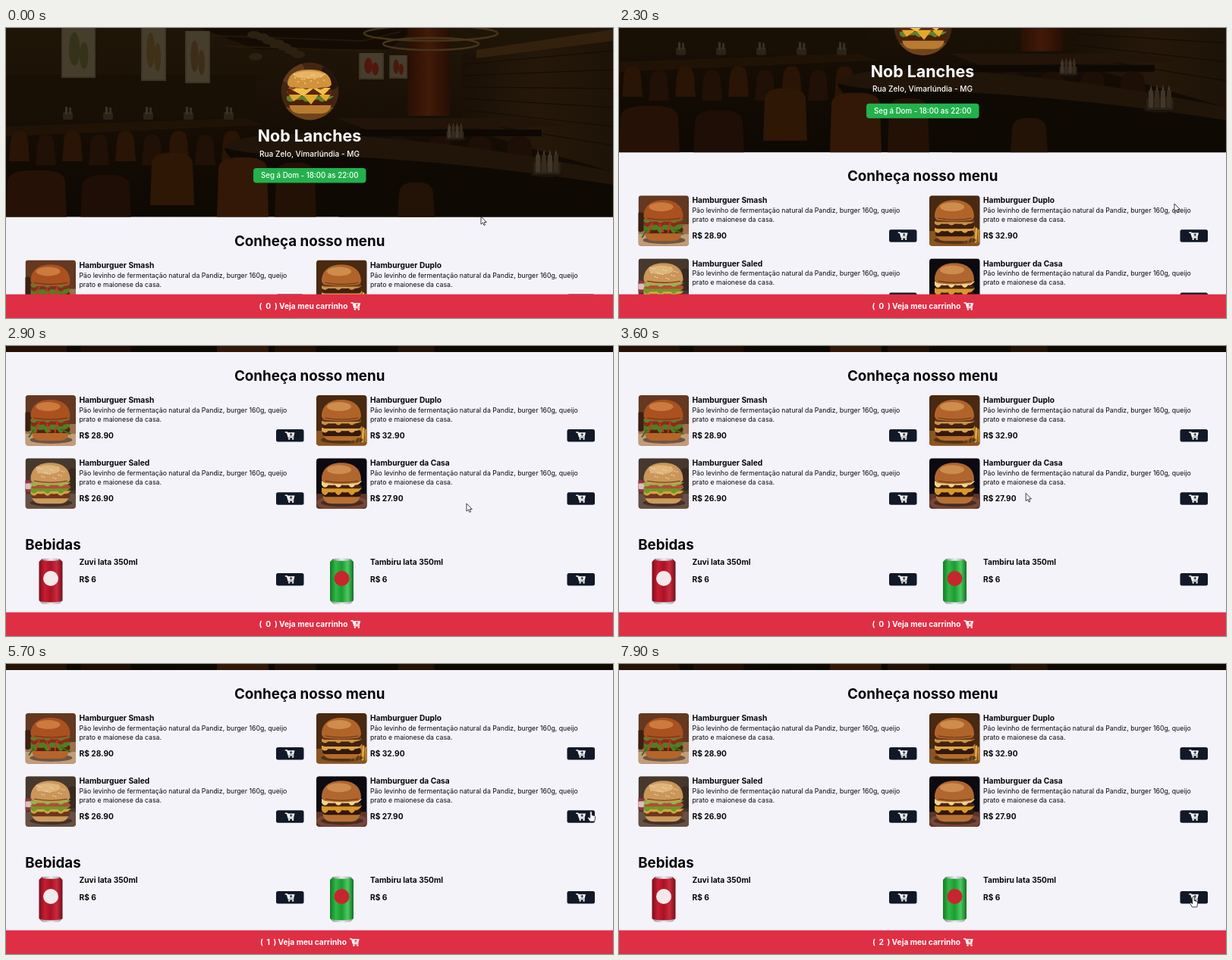
Animation of 800 by 383 pixels, one loop 8000 ms. Source, as an HTML page:

```html
<!DOCTYPE html>
<html lang="pt-BR">
<head>
<meta charset="utf-8">
<title>Menu</title>
<style>
  html, body { margin: 0; width: 100%; height: 100%; overflow: hidden; background: #f4f3f9; }
  svg { display: block; width: 100vw; height: 100vh; }
  text { font-family: Inter, "Open Sans", sans-serif; fill: #08080a; white-space: pre; }
  .b { font-weight: 700; }
  .m { font-weight: 500; }
  .w { fill: #fff; }
  .c { text-anchor: middle; }
  .e { text-anchor: end; }
</style>
</head>
<body>
<svg id="stage" viewBox="0 0 800 383" preserveAspectRatio="none"></svg>
<script>
const LOOP = 8000;
const SCROLL_END = 241.5;
const HERO_HEIGHT = 249.5;

const text = (x, y, size, str, cls = '') =>
  `<text x="${x}" y="${y}" font-size="${size}" class="${cls}">${str}</text>`;
const rect = (x, y, w, h, fill, rx = 0, more = '') =>
  `<rect x="${x}" y="${y}" width="${w}" height="${h}" rx="${rx}" fill="${fill}" ${more}/>`;
const path = (d, fill, more = '') => `<path d="${d}" fill="${fill}" ${more}/>`;
const line = (d, color, width) => path(d, 'none', `stroke="${color}" stroke-width="${width}" stroke-linecap="round"`);
const oval = (x, y, rx, ry, fill, more = '') =>
  `<ellipse cx="${x}" cy="${y}" rx="${rx}" ry="${ry}" fill="${fill}" ${more}/>`;
const group = (x, y, body, scale = 1) => `<g transform="translate(${x} ${y}) scale(${scale})">${body}</g>`;
const gradient = (id, dir, ...stops) => `<linearGradient id="${id}" x2="${dir === 'x' ? 1 : 0}" y2="${dir === 'y' ? 1 : 0}">` +
  stops.map((c, i) => `<stop offset="${i / (stops.length - 1)}" stop-color="${c}"/>`).join('') + '</linearGradient>';
const repeat = (n, fn) => Array.from({ length: n }, (_, i) => fn(i)).join('');

const defs = `<defs>
  ${gradient('wall', 'y', '#1f1507', '#1b1106', '#130b04', '#0e0803')}
  ${gradient('wood', 'x', '#1a1006', '#25180a', '#1e1308')}
  ${gradient('pillar', 'x', '#280f04', '#421a08', '#260e04')}
  ${gradient('red', 'x', '#7d0d1b', '#c81d31', '#a81325', '#c92a3e', '#74101c')}
  ${gradient('green', 'x', '#167a28', '#2fb944', '#1d9a34', '#4bcb5c', '#14702a')}
  ${gradient('steel', 'x', '#8d9095', '#eceef0', '#a0a3a7')}
  <clipPath id="photo"><rect width="66.5" height="66.5" rx="4"/></clipPath>
  <clipPath id="round"><circle cx="400.5" cy="83.5" r="38"/></clipPath>
  <clipPath id="hero"><rect width="800" height="${HERO_HEIGHT}"/></clipPath>
</defs>`;

const poster = (x, y, w, h, food) =>
  rect(x, y, w, h, '#3b3325') + rect(x + 1.5, y, w - 3, h - 2, '#463d2d') +
  oval(x + w * .38, y + h * .48, w * .16, h * .3, food) + oval(x + w * .66, y + h * .6, w * .13, h * .24, food);

const chair = (x, y, w, h, color) =>
  path(`M${x} ${y + h}L${x + 2} ${y + 14}Q${x + 3} ${y + 2} ${x + w * .35} ${y}H${x + w * .65}Q${x + w - 3} ${y + 2} ${x + w - 2} ${y + 14}L${x + w} ${y + h}Z`, color);

const bottles = (x, y, scale) => group(x, y,
  oval(0, 22, 25, 4, '#1b140c') + rect(-20, 4, 40, 18, '#2b2217', 2) +
  repeat(4, i => rect(-17 + i * 9, -8, 7, 27, i % 2 ? '#372b1d' : '#40362a', 2.5) +
    path(`M${-15 + i * 9}-8L${-13.5 + i * 9}-16L${-12 + i * 9}-8Z`, '#4a4033')), scale);

function heroPhoto() {
  return rect(0, 0, 800, 250, 'url(#wall)') +
    path('M255 0H540L505 28H330Z', '#140c04') + path('M0 62H330V105H0Z', '#191005') +
    path('M270 10L470 17L520 5M290 24L500 31', 'none', 'stroke="#291909" stroke-width="1.5"') +
    repeat(9, i => oval(327 + i * 29 % 67, 9 + i * 13 % 31, 9, 5, '#2c2010')) +
    path('M600 35L800 8V190L600 132Z', 'url(#wood)') +
    repeat(6, i => line(`M602 ${48 + i * 15}L800 ${30 + i * 25}`, '#140c05', 1.2)) +
    path('M620 29L800 2V17L620 40Z', '#33210e') +
    poster(73, -8, 45, 74, '#343319') + poster(178, -8, 33, 78, '#3f3118') + poster(236, 4, 33, 69, '#3d2d18') +
    poster(465, 33, 33, 35, '#51160d') + poster(505, 36, 24, 31, '#4a190c') +
    rect(529, 0, 56, 116, 'url(#pillar)') +
    repeat(2, i => oval(560, 7 + i * 14, 88 - i * 25, 10 - i * 2, 'none', 'stroke="#46331a" stroke-width="2.5"')) +
    path('M0 130L315 119L340 128L0 143Z', '#201306') +
    repeat(9, i => chair(4 + i * 35, 136 + i % 2 * 5, 27, 40, i % 2 ? '#201006' : '#291405')) +
    repeat(5, i => group(75 + i * 53, 111, rect(0, 0, 13, 10, '#2c2317', 2) + rect(3, -7, 3, 10, '#3c3225') + rect(8, -6, 3, 9, '#382e21'))) +
    path('M435 119H690L735 129L480 136Z', '#221408') + path('M450 134H706V143H454Z', '#0e0804') +
    repeat(4, i => chair(500 + i * 53, 143, 36, 38, '#1d0f05')) +
    path('M288 160Q292 141 400 139Q560 147 800 205V250H440Q310 203 288 160Z', '#0f0904') +
    path('M288 158Q292 141 400 139Q600 148 800 190V207Q610 177 420 168Q320 169 288 158Z', '#21150a') +
    bottles(592, 134, .58) + bottles(713, 174, .88) +
    chair(0, 188, 80, 62, '#251105') + chair(98, 194, 67, 60, '#1e0e05') +
    chair(190, 165, 58, 69, '#2f1705') + chair(278, 171, 68, 80, '#331807') + chair(354, 178, 55, 73, '#241106') +
    chair(516, 204, 49, 46, '#231206');
}

// Wavy strip used for lettuce, cheese and sauce.
const ruffle = (color, x, y, w, h) => path(`M${x} ${y}H${x + w}` +
  repeat(6, i => `Q${x + w - (i + .5) * w / 6} ${y + h * (i % 2 ? 1.5 : .75)} ${x + w - (i + 1) * w / 6} ${y + h * .65}`) + 'Z', color);

function burger({ back, table, bun, shine, base = bun, layers, extra = '', seeds = 0 }) {
  return rect(0, 0, 67, 67, back) + rect(0, 47, 67, 20, table) + extra +
    oval(34, 59, 28, 5, '#20100a', 'opacity=".5"') +
    path('M9 45H57V52Q55 60 45 60H20Q10 59 9 52Z', base) +
    layers.map(([kind, color, y, h]) => kind === 'bar' ? rect(8, y, 51, h, color, h / 2) : ruffle(color, 7, y, 53, h)).join('') +
    path('M7 28C7 13 18 6 33 6S59 13 59 28Q58 33 51 33Q33 35 15 33Q8 33 7 28Z', bun) +
    oval(30, 15, 16, 6, shine, 'opacity=".75"') +
    line('M12 30Q34 34 55 30', '#6b3013', 1.1) +
    repeat(seeds, i => oval(15 + i * 11 % 37, 12 + i * 7 % 16, 1, .6, '#f5ddaa'));
}

const photos = [
  burger({
    back: '#643821', table: '#c29c79', bun: '#a95120', shine: '#d98848', base: '#b56529',
    extra: rect(0, 38, 67, 13, '#9b704d') + oval(3, 35, 8, 13, '#3b2014'),
    layers: [['bar', '#50230f', 41, 9], ['wave', '#527d22', 38, 11], ['wave', '#8d2a1d', 34, 7], ['wave', '#5f7f2a', 31, 5]]
  }) + line('M18 36L14 49M28 38L33 48M42 36L39 49', '#c9342b', 1.8) + line('M11 46L5 55M47 45L59 51', '#42681b', 2),
  burger({
    back: '#492911', table: '#8a5420', bun: '#b0642a', shine: '#d99b58', base: '#b46c2c',
    extra: repeat(5, i => line(`M${53 + i * 3} ${38 + i * 2}L${46 + i * 5} 61`, i % 2 ? '#dda843' : '#bd8129', 3)),
    layers: [['bar', '#34180d', 46, 8], ['wave', '#dba647', 43, 6], ['bar', '#43200f', 37, 7], ['wave', '#c79345', 34, 5], ['bar', '#65371b', 30, 5]]
  }),
  burger({
    back: '#47382d', table: '#665044', bun: '#ca965a', shine: '#e5bf85', base: '#cb9a5c', seeds: 18,
    extra: oval(3, 37, 12, 8, '#8e3542') + oval(4, 37, 8, 4, '#dac0bd') + oval(62, 28, 9, 15, '#382a20'),
    layers: [['bar', '#6e361d', 46, 7], ['wave', '#d5a43e', 43, 6], ['wave', '#6c992f', 38, 8], ['bar', '#b54c33', 35, 5], ['wave', '#91b64b', 32, 5]]
  }),
  burger({
    back: '#0c0a10', table: '#5d3428', bun: '#b0662f', shine: '#d99758', base: '#b57034',
    extra: oval(34, 59, 34, 11, '#754637'),
    layers: [['bar', '#32150d', 42, 9], ['wave', '#d9982a', 39, 9], ['bar', '#4b2413', 35, 5], ['wave', '#eed58d', 30, 8]]
  })
];

const logo = `<g clip-path="url(#round)">` + group(362, 45,
  rect(0, 0, 77, 77, '#432612') + oval(15, 13, 17, 16, '#60391c') + oval(66, 19, 14, 18, '#26150e') + rect(0, 60, 77, 18, '#70431e') +
  path('M11 54H67Q66 67 54 68H24Q12 67 11 54Z', '#b87b31') + rect(9, 48, 60, 9, '#492009', 4) + ruffle('#62802a', 8, 45, 62, 7) +
  path('M8 39H68L60 52L50 43L40 56L29 43L17 52Z', '#e3a92d') + rect(9, 36, 59, 7, '#5b240d', 3) +
  path('M10 34H66L56 44L43 35L30 45Z', '#efc14a') + ruffle('#96452a', 11, 31, 55, 5) +
  path('M9 29C10 14 22 10 38 10S66 15 67 29Q66 34 58 33Q38 36 18 33Q10 34 9 29Z', '#d0933c') +
  oval(37, 17, 20, 5, '#edbd6c', 'opacity=".8"') +
  repeat(16, i => oval(18 + i * 13 % 43, 16 + i * 7 % 13, 1.1, .7, '#f6d99a'))) + '</g>';

const cart = ink => line('M0 1H2L4 7.5H10.5', '#fff', 1.4) + path('M2.5 1.2H12.2L10.8 6.5H4Z', '#fff') +
  line('M7.4 2.4V5.3M5.9 3.85H8.9', ink, 1) + oval(4.9, 9.6, 1.2, 1.2, '#fff') + oval(9.8, 9.6, 1.2, 1.2, '#fff');

const buttons = [];
function button(x, y) {
  buttons.push([x, y]);
  return group(x, y, rect(0, 0, 36.5, 16.5, '#111827', 2.5) + group(12.3, 3, cart('#111827')));
}

function dish(x, y, name, price, photo, i) {
  return group(x, y, `<g id="photo${i}"><g clip-path="url(#photo)">${photo}</g></g>` +
    text(71, 10.2, 10.2, name, 'b') +
    text(71, 23, 8.73, 'Pão levinho de fermentação natural da Pandiz, burger 160g, queijo') +
    text(71, 35, 8.73, 'prato e maionese da casa.') + text(71, 56.7, 10.2, price, 'b')) +
    button(x + 330.5, y + 45);
}

function drink(x, y, name, color, mark) {
  return group(x, y,
    path('M18 7L22 3H45L49 7V58L45 62H22L18 58Z', `url(#${color})`) +
    oval(33.5, 4, 12, 1.8, 'url(#steel)') + path('M19 59Q33 62 48 59L44.5 62.5Q33 64 22.5 62.5Z', 'url(#steel)') +
    oval(33.5, 29, 10, 10, mark) +
    text(71, 11, 10.2, name, 'b') + text(71, 33.7, 10.2, 'R$ 6', 'b')) + button(x + 330.5, y + 22);
}

const dishes = [['Hamburguer Smash', '28.90'], ['Hamburguer Duplo', '32.90'], ['Hamburguer Saled', '26.90'], ['Hamburguer da Casa', '27.90']];
const column = i => i % 2 ? 409 : 25.5;

const page = `<g clip-path="url(#hero)">${heroPhoto()}</g>` + logo +
  text(400, 150, 21.4, 'Nob Lanches', 'b w c') +
  text(400, 169.7, 10.1, 'Rua Zelo, Vimarlúndia - MG', 'm w c') +
  rect(326, 185, 148.5, 19.5, '#23b14c', 4) + text(400.3, 198.4, 9.7, 'Seg á Dom - 18:00 as 22:00', 'm w c') +
  text(400.2, 287.6, 18.8, 'Conheça nosso menu', 'b c') +
  dishes.map(([name, price], i) => dish(column(i), 306.5 + (i >> 1) * 83.2, name, 'R$ ' + price, photos[i], i)).join('') +
  text(25.2, 510.7, 18.7, 'Bebidas', 'b') +
  drink(column(0), 519.5, 'Zuvi lata 350ml', 'red', '#f4e9ea') +
  drink(column(1), 519.5, 'Tambiru lata 350ml', 'green', '#c9252f');

const bar = rect(0, 351.7, 800, 31.3, '#df2f45') +
  `<g id="left">${text(333.6, 370.8, 10.2, '(', 'b w')}</g>` +
  `<text id="count" x="345.7" y="370.8" font-size="10.2" class="b w c"></text>` +
  `<g id="right">${text(357.8, 370.8, 10.2, ')', 'b w e') + text(360, 370.8, 10.2, 'Veja meu carrinho', 'b w') + group(455, 362, cart('#df2f45'))}</g>`;

const outline = 'stroke="#111" stroke-width=".8" stroke-linejoin="round"';
const pointer = `<g id="pointer">` +
  path('M0 0V10.2L2.4 8.1L4 11.6L5.6 10.8L4.1 7.5H7.3Z', '#fff', `id="arrow" ${outline}`) +
  path('M-1.3 .2Q0-1.2 1.3 .2V4.6L4.7 5.5Q6 6 5.6 8.2L4.7 13H-1.6L-4.3 8.5Q-4.5 6.7-3 7.2L-1.3 8.6Z', '#fff', `id="hand" ${outline}`) + '</g>';

const $ = id => document.getElementById(id);
$('stage').innerHTML = defs + `<g id="page">${page}</g>` + bar + pointer;

const clamp = v => Math.min(1, Math.max(0, v));
const smooth = v => v * v * (3 - 2 * v);
const linear = v => v;

// Each key is [time, ...values].
function track(keys, t, ease) {
  const i = keys.findIndex(k => k[0] > t);
  if (i < 0) return keys[keys.length - 1].slice(1);
  if (!i) return keys[0].slice(1);
  const [a, b] = [keys[i - 1], keys[i]];
  const u = ease((t - a[0]) / (b[0] - a[0]));
  return a.slice(1).map((v, j) => v + (b[j + 1] - v) * u);
}

const scrollKeys = [[2000, 0], [2300, 85], [2850, SCROLL_END]];
const pointerKeys = [
  [200, 626, 249], [1500, 732, 228], [1800, 732, 228], [2300, 732, 232], [2900, 607, 208],
  [4400, 450, 178], [4700, 450, 178], [5500, 771, 195], [6000, 771, 195], [7100, 757, 308]
];

function draw(t) {
  const [scroll] = track(scrollKeys, t, linear);
  $('page').setAttribute('transform', `translate(0 ${-scroll})`);

  const hover = smooth(clamp((t - 4000) / 300)) - smooth(clamp((t - 4840) / 300));
  $('photo3').setAttribute('transform',
    `translate(33.25 33.25) rotate(${-2 * hover}) scale(${1 + .1 * hover}) translate(-33.25 -33.25)`);

  const count = t < 5600 ? 0 : t < 7400 ? 1 : 2;
  const inset = [0, 1.5, .4][count];
  $('count').textContent = count;
  $('left').setAttribute('transform', `translate(${inset} 0)`);
  $('right').setAttribute('transform', `translate(${-inset} 0)`);

  const [x, y] = track(pointerKeys, t, smooth);
  const onButton = buttons.some(([bx, by]) => x > bx && x < bx + 36.5 && y + scroll > by && y + scroll < by + 16.5);
  $('pointer').setAttribute('transform', `translate(${x} ${y})`);
  $('arrow').style.display = onButton ? 'none' : '';
  $('hand').style.display = onButton ? '' : 'none';
}

const start = performance.now();
function tick() {
  draw((performance.now() - start) % LOOP);
  requestAnimationFrame(tick);
}
tick();
</script>
</body>
</html>
```
